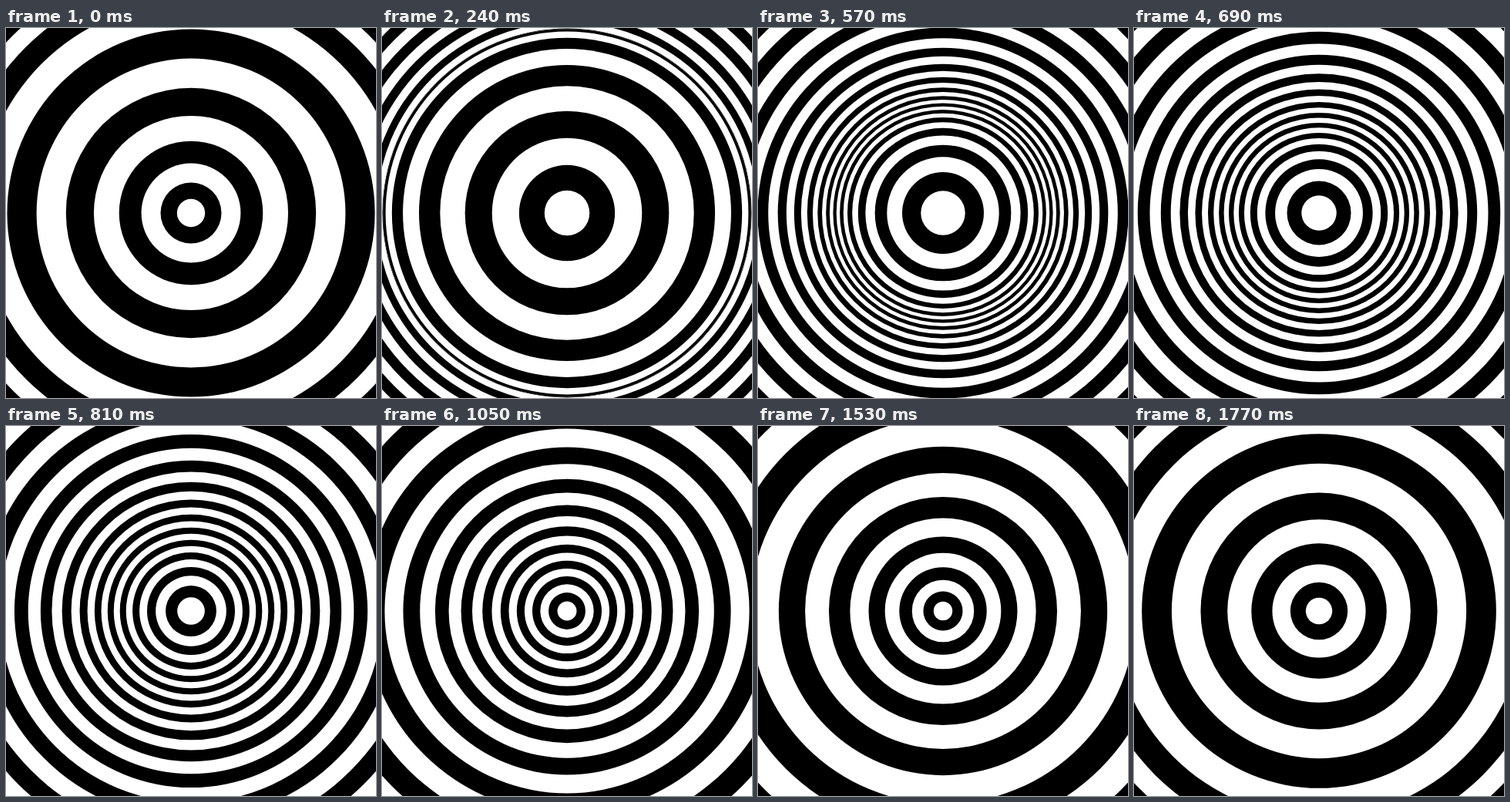
An HTML page with a canvas that plays this animation: 480x480 px, repeating every 1.8 s.

```html
<!DOCTYPE html>
<html lang="en">
<head>
<meta charset="utf-8">
<title>Rings</title>
<style>
  html, body { margin: 0; width: 100%; height: 100%; overflow: hidden; background: #000; }
  canvas { display: block; width: 100vmin; height: 100vmin; }
</style>
</head>
<body>
<canvas id="stage" width="480" height="480"></canvas>
<script>
const ctx = document.getElementById('stage').getContext('2d');
const LOOP = 1800, STEP = 30, RINGS = 60;
const rad = Math.PI / 180;

// Rings on a bowl seen from above; a wave lifts each one toward the eye.
function radius(n, time) {
  const angle = (time / LOOP * 360 - 80 + 8.55 * (n - 1)) * rad;
  const bowl = 0.0603 + 33.5e-6 * n ** 2 + 2e-9 * n ** 4;
  return n / (bowl - 0.0308 * Math.cos(angle));
}

function draw(time) {
  ctx.fillStyle = '#000';
  ctx.fillRect(0, 0, 480, 480);
  for (let n = RINGS; n > 0; n--) {
    ctx.fillStyle = n % 2 ? '#fff' : '#000';
    ctx.beginPath();
    ctx.arc(240, 240, radius(n, time), 0, 2 * Math.PI);
    ctx.fill();
  }
}

const start = performance.now();
function tick() {
  const time = (performance.now() - start) % LOOP;
  draw(Math.floor(time / STEP) * STEP);
  requestAnimationFrame(tick);
}
tick();
</script>
</body>
</html>
```
